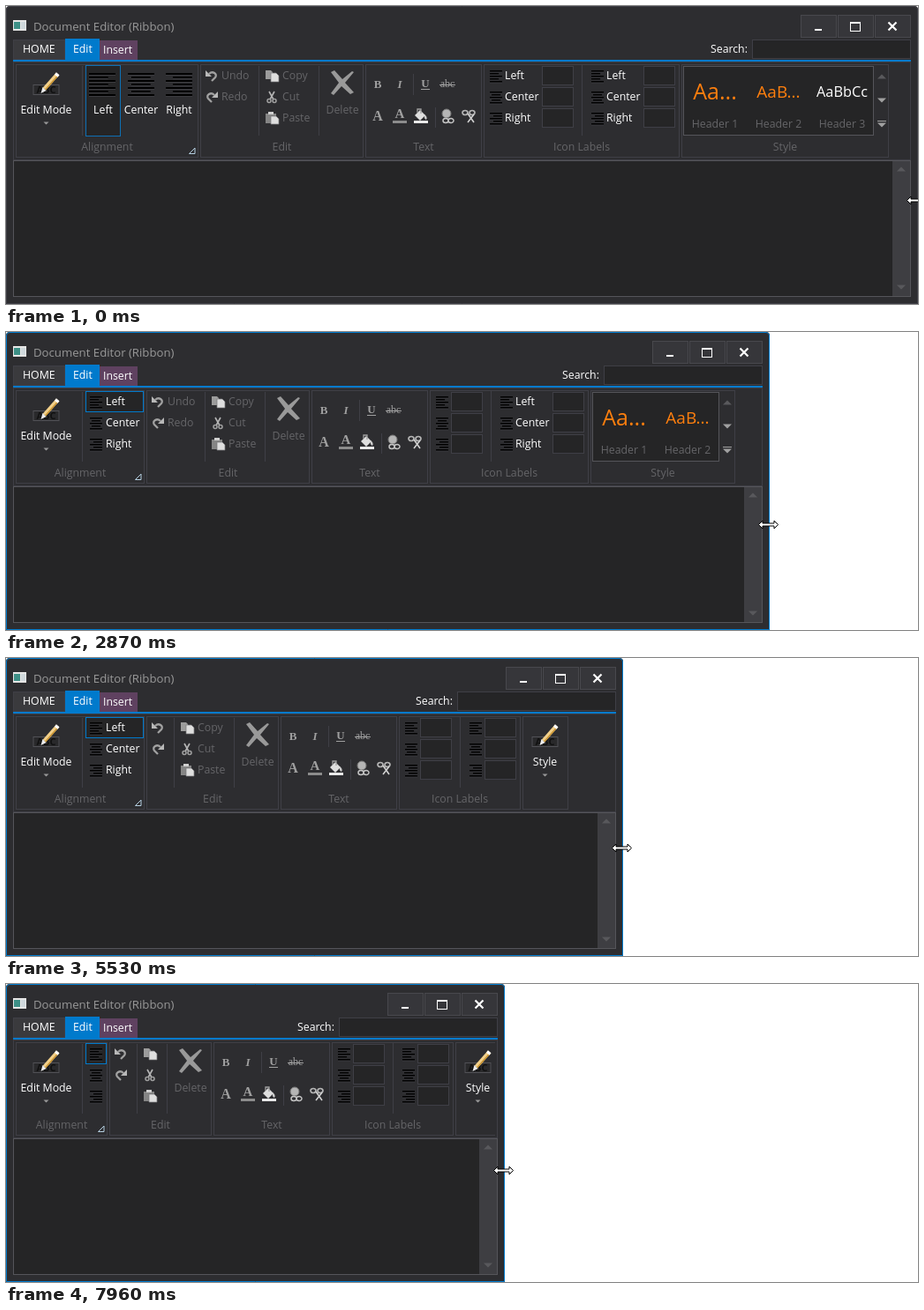
Write an HTML page with a canvas that moves like this. It is 1033 px wide and 338 px high and loops after 8 s.

```html
<!DOCTYPE html>
<html>
<head>
<meta charset="utf-8">
<style>
  html, body { margin: 0; width: 100%; height: 100%; overflow: hidden; background: #fff; }
  canvas { display: block; }
</style>
</head>
<body>
<canvas id="stage" width="1033" height="338"></canvas>
<script>
const ctx = document.getElementById('stage').getContext('2d');
const LOOP = 8000, HEIGHT = 338;
const BG = '#2d2d30', DARK = '#252526', EDGE = '#3f3f46', RIM = '#55555a', BLUE = '#007acc';
const WHITE = '#fff', DIM = '#656568', GREY = '#a0a0a0', ORANGE = '#ff7f0e';
const ROWS = [79, 103, 127], ALIGNS = ['Left', 'Center', 'Right'];

// Each drag of the right window edge; `bend` shapes its easing.
const drags = [
  { start: 160, end: 590, steps: 11, from: 1033, to: 982, y0: 220, y1: 219, bend: .65 },
  { start: 1270, end: 1720, steps: 11, from: 982, to: 918, y0: 219, y1: 220, bend: .65 },
  { start: 2310, end: 2680, steps: 10, from: 918, to: 865, y0: 221, y1: 218, bend: .775 },
  { start: 3330, end: 3660, steps: 9, from: 865, to: 808, y0: 218, y1: 216, bend: .65 },
  { start: 4310, end: 4760, steps: 11, from: 808, to: 759, y0: 216, y1: 215, bend: .49 },
  { start: 5360, end: 5980, steps: 16, from: 759, to: 626, y0: 215, y1: 216, bend: .65 },
  { start: 6760, end: 7060, steps: 7, from: 626, to: 592, y0: 216, y1: 213, bend: .65 },
  { start: 7790, end: 7960, steps: 5, from: 592, to: 565, y0: 213, y1: 211, bend: .65 }
];
// The ribbon collapses by one level shortly after a drag.
const collapses = [730, 1900, 2870, 3940, 4940, 6170, 7230];

function pose(t) {
  let width = 1033, y = 220, lag = 0;
  for (const d of drags) {
    if (t < d.start) break;
    const step = Math.floor((t - d.start) / (d.end - d.start) * (d.steps - 1) + 1e-6);
    const q = Math.min(1, (step + 1) / d.steps) ** d.bend;
    const p = q * q * (3 - 2 * q);
    width = Math.round(d.from + (d.to - d.from) * p);
    y = Math.round(d.y0 + (d.y1 - d.y0) * p);
    lag = step === 0 ? 3 : 0;
  }
  return { width, y, lag };
}

function rect(x, y, w, h, fill, stroke) {
  if (fill) { ctx.fillStyle = fill; ctx.fillRect(x, y, w, h); }
  if (stroke) { ctx.strokeStyle = stroke; ctx.lineWidth = 1; ctx.strokeRect(x + .5, y + .5, w - 1, h - 1); }
}
const vline = (x, y0, y1) => rect(x, y0, 1, y1 - y0, EDGE);

function text(s, x, midY, color = WHITE, align = 'left', font = '12.3px "Open Sans", sans-serif') {
  ctx.font = font;
  ctx.textAlign = align;
  ctx.fillStyle = color;
  ctx.fillText(s, x, midY + 4);
}

function shape(d, x, y, fill, stroke, lineWidth = 1, flip = 1) {
  const path = new Path2D(d);
  ctx.save();
  ctx.translate(x, y);
  ctx.scale(flip, 1);
  if (fill) { ctx.fillStyle = fill; ctx.fill(path); }
  if (stroke) { ctx.strokeStyle = stroke; ctx.lineWidth = lineWidth; ctx.stroke(path); }
  ctx.restore();
}
const downArrow = (x, y, color, r = 5) => shape(`M${-r} ${-r / 2}H${r}L0 ${r / 2}Z`, x, y, color);
const upArrow = (x, y, color) => shape('M-5 2.5H5L0-2.5Z', x, y, color);

// Paragraph icon: alternating long and short lines, align 0..2.
function paragraph(x, y, w, count, gap, weight, align) {
  for (let i = 0; i < count; i++) {
    const len = i % 2 ? w * .72 : w;
    const lx = Math.round(x + (w - len) * align / 2);
    if (weight > 1) rect(lx, y + i * gap + weight, len, 1, '#3c3c40');
    rect(lx, y + i * gap, len, weight, '#000');
  }
}
const smallParagraph = (x, row) => paragraph(x, ROWS[row] - 6, 14, 5, 3, 1.5, row);

function pencilButton(label, x) {
  rect(x - 15, 89, 30, 12, '#29292b', '#515156');
  text('ABC', x, 95, '#111', 'center', 'bold 11px "Open Sans", sans-serif');
  shape('M13-10L-2 7', x, 87, null, '#f2d08a', 4.5);
  shape('M14-9L-1 8', x, 87, null, '#c9922e', 1.3);
  shape('M-4 5L0 9L-6 12Z', x, 87, '#eee');
  shape('M10.5-10.5L14-7.5', x, 87, null, '#fff', 3);
  text(label, x, 118, WHITE, 'center');
  downArrow(x, 133, '#999', 3);
}

function group(x, stride, caption) {
  rect(x, 66, stride - 2, 106, null, EDGE);
  text(caption, x + stride / 2 - 1, 160, DIM, 'center');
}

function alignment(x, level) {
  const stride = level < 3 ? 209 : level < 7 ? 148 : 106;
  group(x, stride, 'Alignment');
  pencilButton('Edit Mode', x + 34.5);
  vline(x + 75, 68, 147);
  if (level < 3) {
    rect(x + 79, 67, 40, 81, DARK, '#0e70b5');
    ALIGNS.forEach((name, i) => {
      paragraph(x + 83 + i * 43.5, 76, 30, 7, 4, 2, i);
      text(name, x + 99 + i * 43, 118, WHITE, 'center');
    });
  } else {
    rect(x + 79, 67, level < 7 ? 66 : 24, 24, DARK, BLUE);
    ALIGNS.forEach((name, i) => {
      smallParagraph(x + 84, i);
      if (level < 7) text(name, x + 102, ROWS[i]);
    });
  }
  shape('M7 .5V7H.5Z', x + stride - 13, 160.5, null, '#b5cfe0', 1);
  return stride;
}

function clipIcons(x) {
  shape('M-7-6H-1L1-4V4H-7Z', x, 79, '#9c9c9c');
  shape('M-1-3H5L8 0V7H-1Z', x, 79, '#dedede', '#77777a', .7);
  shape('M-3-6L2 3M3-6L-2 3', x, 103, null, '#b4b4b4', 1.6);
  shape('M-5 4.5a2 2 0 1 0 4 0a2 2 0 1 0-4 0M1 4.5a2 2 0 1 0 4 0a2 2 0 1 0-4 0', x, 103, null, GREY, 1.5);
  shape('M-7-5H5V6H-7Z', x, 127, '#858585');
  shape('M-4-7H2V-4H-4Z', x, 127, '#d0d0d0');
  shape('M-1-2H5L8 1V7H-1Z', x, 127, '#dedede', '#77777a', .7);
}

function editing(x, level) {
  const undoCut = level < 4 ? 0 : 35, copyCut = level < 6 ? 0 : 34;
  const stride = 187 - undoCut - copyCut;
  group(x, stride, 'Edit');
  ['Undo', 'Redo'].forEach((name, i) => {
    const flip = i ? -1 : 1;
    shape('M-3-2C1-6 7-2 4 2L0 6', x + 13, ROWS[i], null, GREY, 2.3, flip);
    shape('M-7-6V1H0Z', x + 13, ROWS[i], '#b8b8b8', null, 1, flip);
    if (!undoCut) text(name, x + 24, ROWS[i], DIM);
  });
  vline(x + 66 - undoCut, 68, 147);
  const cx = x - undoCut;
  clipIcons(cx + 81);
  if (!copyCut) ['Copy', 'Cut', 'Paste'].forEach((name, i) => text(name, cx + 93, ROWS[i], DIM));
  vline(cx + 134 - copyCut, 68, 147);
  const dx = cx + 161 - copyCut;
  shape('M-13-12L-9-14L0-4L11-13L13-12L3 0L13 11L9 13L-1 4L-10 14L-13 12L-4 0Z', dx, 87, '#999');
  text('Delete', dx, 118, DIM, 'center');
  return stride;
}

function textTools(x) {
  group(x, 134, 'Text');
  const serif = (s, dx, y, style) => text(s, x + dx, y, GREY, 'center', style + ' "Liberation Serif", serif');
  serif('B', 14, 89, 'bold 13px');
  serif('I', 39, 89, 'italic bold 13px');
  serif('U', 68, 88, 'bold 13px');
  rect(x + 63, 94, 10, 1, GREY);
  serif('abc', 93, 88, '12px');
  rect(x + 84, 89, 18, 1, GREY);
  vline(x + 54, 77, 101);
  serif('A', 14, 126, 'bold 16px');
  serif('A', 39, 123, 'bold 15px');
  rect(x + 31, 130, 16, 3, '#8c8c8c');
  shape('M-6 0L0-6L6 0L0 6Z', x + 62, 124, '#dedede');
  shape('M-3-3V-7H1V-2', x + 62, 124, null, GREY, 1.3);
  shape('M5-1Q9 2 7 5Q4 4 5-1Z', x + 62, 124, '#ccc');
  rect(x + 55, 130, 16, 3, '#e8e8e8');
  vline(x + 79, 115, 138);
  shape('M-6-3a5 5 0 1 0 10 0a5 5 0 1 0-10 0', x + 93, 125, '#b5b5b5', '#777', 1);
  shape('M-5 5a3 2.5 0 1 0 6 0a3 2.5 0 1 0-6 0M1 5a3 2.5 0 1 0 6 0a3 2.5 0 1 0-6 0', x + 93, 125, null, '#c4c4c4', 1.5);
  shape('M-7-4a3 2.5 0 1 0 6 0a3 2.5 0 1 0-6 0M1-4a3 2.5 0 1 0 6 0a3 2.5 0 1 0-6 0', x + 117, 125, null, '#b5b5b5', 1.7);
  shape('M-1-3L6 7M6-2L-1 7', x + 117, 125, null, '#d0d0d0', 1.6);
  return 134;
}

function iconLabels(x, level) {
  const cuts = [level < 2 ? 0 : 42, level < 5 ? 0 : 42];
  const stride = 224 - cuts[0] - cuts[1];
  group(x, stride, 'Icon Labels');
  let left = x + 7;
  cuts.forEach((cut, column) => {
    ALIGNS.forEach((name, i) => {
      smallParagraph(left, i);
      if (!cut) text(name, left + 17, ROWS[i]);
      rect(left + 59 - cut, ROWS[i] - 11, 36, 22, DARK, EDGE);
    });
    if (!column) vline(left + 104 - cut, 67, 147);
    left += 115 - cut;
  });
  return stride;
}

function styles(x, level) {
  if (level > 4) {
    rect(x, 66, 52, 106, null, EDGE);
    pencilButton('Style', x + 25.5);
    return;
  }
  const count = level ? 2 : 3, right = x + 2 + 72 * count;
  group(x, 22 + 72 * count + (level ? 0 : -1), 'Style');
  rect(x + 2, 68, 72 * count, 79, DARK, RIM);
  [['Aa...', 25, 102, ORANGE], ['AaB...', 19, 100, ORANGE], ['AaBbCc', 16.3, 99, WHITE]]
    .slice(0, count).forEach(([sample, size, y, color], i) => {
      const cx = x + 38 + 72 * i;
      text(sample, cx, y, color, 'center', size + 'px "Open Sans", sans-serif');
      text('Header ' + (i + 1), cx, 134, DIM, 'center');
    });
  upArrow(right + 9, 80, '#59595c');
  downArrow(right + 9, 107, GREY);
  rect(right + 4, 130, 10, 1, GREY);
  downArrow(right + 9, 135, GREY);
}

function titleBar(w) {
  rect(8, 16, 15, 12, '#e6e6e6');
  rect(9, 18, 7, 8, '#3d8f86');
  rect(17, 18, 5, 8, '#cfd8dc');
  text('Document Editor (Ribbon)', 31, 23.5, '#999', 'left', '13.2px "Open Sans", sans-serif');
  for (const dx of [133, 91, 49]) rect(w - dx, 10, 41, 26, '#36363a', '#48484d');
  rect(w - 117, 26, 8, 2, WHITE);
  rect(w - 77, 18, 12, 11, null, WHITE);
  rect(w - 77, 18, 12, 2, WHITE);
  shape('M-4.5-4.5L4.5 4.5M4.5-4.5L-4.5 4.5', w - 29, 23, null, WHITE, 2.2);
}

function tabs(w) {
  rect(8, 38, 59, 23, '#3a3a3d', EDGE);
  rect(67, 37, 39, 25, BLUE);
  rect(106, 39, 43, 22, '#5f4160');
  text('HOME', 19, 49);
  text('Edit', 76, 49);
  text('Insert', 110, 50);
  text('Search:', w - 235, 49);
  rect(w - 188, 38, 180, 22, DARK, EDGE);
  rect(8, 61, w - 16, 2, BLUE);
}

function ribbon(w, level) {
  rect(8, 63, w - 16, 112, null, EDGE);
  ctx.save();
  ctx.beginPath();
  ctx.rect(0, 63, w - 11, 112);
  ctx.clip();
  let x = 11;
  for (const part of [alignment, editing, textTools, iconLabels, styles]) x += part(x, level);
  ctx.restore();
}

function editor(w) {
  rect(8, 175, w - 16, 155, DARK);
  rect(w - 29, 176, 20, 153, '#3e3e42');
  upArrow(w - 19, 185, '#58585c');
  downArrow(w - 19, 319, '#58585c');
  rect(8, 175, w - 16, 155, null, RIM);
}

function draw() {
  const t = performance.now() % LOOP;
  const { width, y, lag } = pose(t);
  const level = collapses.filter(at => t >= at).length;
  const inner = width + lag;
  rect(0, 0, 1033, HEIGHT, WHITE);

  ctx.save();
  ctx.beginPath();
  ctx.roundRect(0, 0, width, HEIGHT, [4, 4, 0, 0]);
  ctx.clip();
  rect(0, 0, width, HEIGHT, BG);
  titleBar(inner);
  tabs(inner);
  ribbon(inner, level);
  editor(inner);
  ctx.beginPath();
  ctx.roundRect(.5, .5, width - 1, HEIGHT - 1, [3.5, 3.5, 0, 0]);
  ctx.strokeStyle = t < 160 ? EDGE : BLUE;
  ctx.lineWidth = 1;
  ctx.stroke();
  ctx.restore();

  const nudge = t >= 1720 && t < 2100 ? 3 : 1.5;
  shape('M-11 0L-6.5-4.5V-1.5H6.5V-4.5L11 0L6.5 4.5V1.5H-6.5V4.5Z', width - nudge, y + .5, WHITE, '#000');
  requestAnimationFrame(draw);
}
draw();
</script>
</body>
</html>
```
